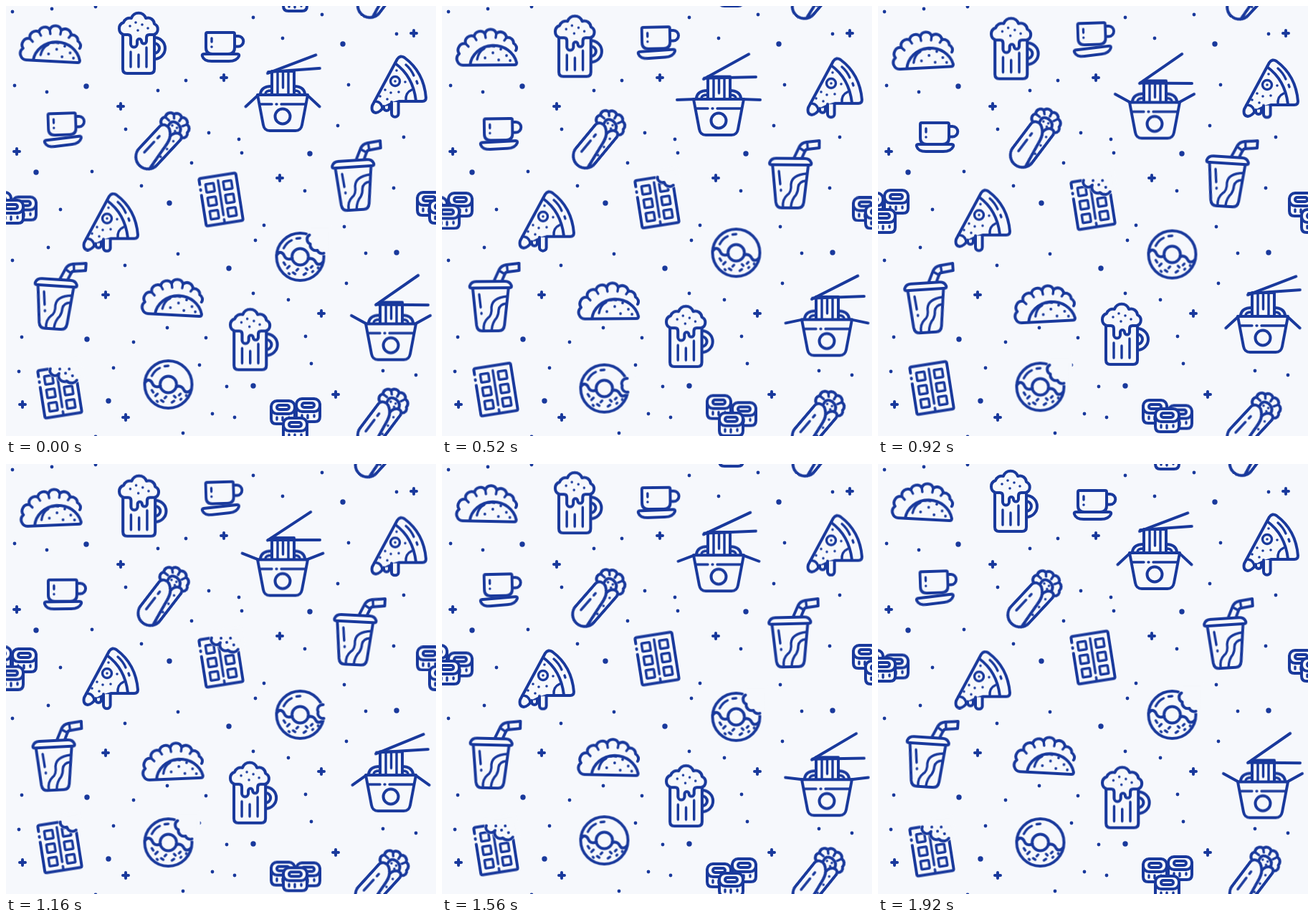
Recreate the animation shown at these times as an HTML page. Size 600 by 600 pixels, loop 1960 ms.

```html
<!DOCTYPE html>
<html lang="en">
<head>
<meta charset="utf-8">
<title>Street food pattern</title>
<style>
  :root { --ink: #19399c; --paper: #f6f8fc; }
  html, body { margin: 0; width: 100%; height: 100%; overflow: hidden; background: var(--paper); }
  svg {
    display: block; width: 100vw; height: 100vh;
    fill: none; stroke: var(--ink); stroke-width: 4;
    stroke-linecap: round; stroke-linejoin: round;
  }
  .solid { fill: var(--paper); }
  .fine { stroke-width: 3.4; }
  .dots { fill: var(--ink); stroke: none; }
  .erase { fill: var(--paper); stroke: var(--paper); stroke-width: 5; }
  .drip { vector-effect: non-scaling-stroke; }

  /* Each loop runs 1920 ms, then rests for 40 ms. */
  .sway, .wave, .bite { animation: 1960ms infinite; }
  .sway { animation-name: sway; animation-timing-function: cubic-bezier(.364, 0, .636, 1); }
  .wave { animation-name: wave; }
  .bite { animation-timing-function: step-end; }
  .first { animation-name: first; }
  .second { animation-name: second; }
  .alt .sway { animation-name: sway-alt; }
  .alt .wave { animation-name: wave-alt; }
  .alt .first { animation-name: first-alt; }
  .alt .second { animation-name: second-alt; }

  @keyframes sway {
    0%, 97.96%, 100% { transform: var(--a); }
    48.98% { transform: var(--b); }
  }
  @keyframes sway-alt {
    0%, 97.96%, 100% { transform: var(--b); }
    48.98% { transform: var(--a); }
  }
  @keyframes wave {
    0% { transform: translateY(0px); animation-timing-function: cubic-bezier(.39, .575, .565, 1); }
    24.49% { transform: translateY(var(--up)); animation-timing-function: cubic-bezier(.364, 0, .636, 1); }
    73.47% { transform: translateY(var(--down)); animation-timing-function: cubic-bezier(.47, 0, .745, .715); }
    97.96%, 100% { transform: translateY(0px); }
  }
  @keyframes wave-alt {
    0% { transform: translateY(0px); animation-timing-function: cubic-bezier(.39, .575, .565, 1); }
    24.49% { transform: translateY(var(--down)); animation-timing-function: cubic-bezier(.364, 0, .636, 1); }
    73.47% { transform: translateY(var(--up)); animation-timing-function: cubic-bezier(.47, 0, .745, .715); }
    97.96%, 100% { transform: translateY(0px); }
  }
  @keyframes first { 0%, 28.57%, 100% { opacity: 0; } 10.2% { opacity: 1; } }
  @keyframes second { 0%, 68.37%, 100% { opacity: 0; } 28.57% { opacity: 1; } }
  @keyframes first-alt { 0%, 77.55%, 100% { opacity: 0; } 59.18% { opacity: 1; } }
  @keyframes second-alt { 0%, 77.55%, 100% { opacity: 1; } 19.39% { opacity: 0; } }
</style>
</head>
<body>
<svg id="stage" viewBox="0 0 600 600"></svg>
<script>
const path = (d, cls = '') => `<path class="${cls}" d="${d}"/>`;
const fine = d => path(d, 'fine');
const at = (x, y, body, more = '') => `<g transform="translate(${x} ${y}) ${more}">${body}</g>`;
const sway = (a, b, body, origin = '0px 0px') =>
  `<g class="sway" style="--a:${a};--b:${b};transform-origin:${origin}">${body}</g>`;
const rise = (y, body) => sway('translateY(0px)', `translateY(${y}px)`, body);
const wave = (y, body) => `<g class="wave" style="--up:${y}px;--down:${-y}px">${body}</g>`;

function dots(r, list) {
  let d = '';
  for (let i = 0; i < list.length; i += 2)
    d += `M${list[i] - r} ${list[i + 1]}a${r} ${r} 0 1 0 ${2 * r} 0a${r} ${r} 0 1 0 ${-2 * r} 0`;
  return path(d, 'dots');
}

// A bite erases an edge, then outlines the scallops left behind.
const bite = (order, edge, outside, crumbs = '') =>
  `<g class="bite ${order}">${path(edge + outside + 'Z', 'erase')}${path(edge)}${crumbs}</g>`;

function taco() {
  return sway('translateY(-5px) rotate(3deg)', 'translateY(4.5px) rotate(-3deg)',
    path('M30 82A9 9 0 0 1 24 66A9 9 0 0 1 33 52A8.5 8.5 0 0 1 45 42A8.5 8.5 0 0 1 60 38A8.5 8.5 0 0 1 76 38A8.5 8.5 0 0 1 90 44A8 8 0 0 1 100 52A7 7 0 0 1 103 62') +
    fine('M33 52l4 4M45 42l3 5M60 38l1 6M76 38l-1 6M90 44l-3 4') +
    path('M30 82H101Q104 82 104 79A33 31 0 0 0 39 82', 'solid') +
    fine('M49 74Q51 63 59 59M65 56Q69 55 73 56') +
    dots(1.9, [82, 60, 71, 65, 90, 69, 60, 72, 79, 75, 95, 76]), '62px 60px');
}

function mug() {
  return sway('translateY(0px) scaleX(1)', 'translateY(7.5px) scaleX(1.025)',
    path('M207 44A15 15 0 0 1 207 74M207 52A7 7 0 0 1 207 66') +
    path('M163 40V88q0 6 6 6H201q6 0 6 -6V40', 'solid') +
    fine('M174 64V85M185 68V85M196 58V85') +
    path('M164 40A9 9 0 0 1 164 23A9 9 0 0 1 175 17A10.5 10.5 0 0 1 195 17A9 9 0 0 1 207 25A8 8 0 0 1 206 40H200q-4 0 -4 4V49a3.5 3.5 0 0 1 -7 0a3 3 0 0 0 -6 0V53a4.5 4.5 0 0 1 -9 0V44q0 -4 -4 -4Z', 'solid') +
    dots(1.8, [181, 23, 190, 26, 173, 28, 198, 31, 184, 34]), '157px 0px');
}

function cup() {
  return sway('translateY(0px) rotate(0deg)', 'translateY(-8.5px) rotate(-7deg)',
      path('M276 67H323Q326 67 325 70Q322 77 311 77H287Q276 77 274 70Q273 67 276 67Z', 'solid'), '300px 70px') +
    sway('translateY(0px) rotate(0deg) scaleX(1)', 'translateY(-12.5px) rotate(-2deg) scaleX(.96)',
      path('M319 42H324a7.3 7.3 0 0 1 0 14.6H319') +
      path('M281 37H317Q319 37 319 39V58q0 9 -9 9H288q-9 0 -9 -9V39Q279 37 281 37Z', 'solid') +
      fine('M287 45V50') + dots(1.8, [287, 57]), '278px 52px');
}

function noodles() {
  const wing = at(352, 124, sway('rotate(-43deg)', 'rotate(29deg)', path('M0 0H-24')));
  const heap = path('M355 122Q357 112 370 112') + fine('M362 122Q363 118 370 118');
  const mirror = body => at(772, 0, body, 'scale(-1 1)');
  return rise(10.5, heap + mirror(heap)) +
    rise(13.5, path('M371 126V91H402V126', 'solid') + fine('M379 93V124M386.5 93V114M394 93V124')) +
    rise(10.5,
      path('M351 124H421L413 166q-1.5 8 -9 8H368q-7.5 0 -9 -8Z', 'solid') +
      fine('M355 137H371M377 137h1M384 137H417') +
      '<circle cx="386" cy="154" r="10.5"/>' + wing + mirror(wing)) +
    sway('translate(365px,94px) rotate(-20.8deg)', 'translate(365px,108px) rotate(-34.8deg)', path('M0 0H72')) +
    sway('translate(366px,92px) rotate(-4deg)', 'translate(366px,107.5px) rotate(.5deg)', path('M0 0H72'));
}

function pizza() {
  return rise(5,
    path('M546 74Q550 68 556 72Q583 92 586 128Q586 133 581 133H549L536 137L526 142Q522 148 516 149Q509 148 511 139Z', 'solid') +
    path('M543 80Q568 98 572 132') +
    fine('M558 82Q565 88 569 97M573 105L574 108') +
    fine('M558 132Q557 121 566 117M514 133Q524 133 525 143') +
    '<circle cx="543" cy="105" r="6.5" class="fine"/>' +
    path('M527 140V142a4 4 0 0 0 8 0V139', 'solid') +
    sway('scaleY(1)', 'scaleY(.79)',
      path('M538 134V150a4.8 4.8 0 0 0 9.6 0V134', 'solid drip'), '0px 134px') +
    dots(1.8, [543, 105, 529, 117, 537, 121, 522, 126, 548, 120, 532, 130, 545, 90, 557, 106]));
}

function burrito() {
  return at(220, 187, sway('translate(0px,0px) rotate(-47deg)', 'translate(1px,-4.5px) rotate(-53deg)',
    path('M14 -17A6.5 6.5 0 0 1 25 -20A7 7 0 0 1 36 -14A7 7 0 0 1 40 -3A7 7 0 0 1 38 9A7 7 0 0 1 30 17A6 6 0 0 1 20 17', 'solid') +
    fine('M25 -20L25 -13M36 -14L32 -10M40 -3L34 -2M38 9L32 6') +
    path('M17 -8Q29 -13 30 -1Q30 8 21 10') +
    path('M10 -17H-32A17 17 0 0 0 -32 17H16Q23 16 21 9Q18 3 10 3Q20 -5 17 -12Q15 -17 10 -17Z', 'solid') +
    path('M10 3Q4 7 -8 8L-43 13') +
    fine('M-31 -8H-11M-4 -8H0') +
    dots(1.8, [23, -5, 25, 2, 20, 3, -20, 13, -6, 12, 8, 11])));
}

function soda() {
  return sway('translateY(2.5px) rotate(-3.7deg)', 'translateY(-2.5px) rotate(3.7deg)',
    path('M491 212L498 197Q501 191 508 190L526 188V198L510 200Q507 200 506 203L502 212', 'solid') +
    fine('M509 190L510 200M498 198L506 203') +
    path('M461 222L466 274q1 8 8 8H497q7 0 8 -8L511 222', 'solid') +
    fine('M476 281Q475 270 482 264Q488 260 487 249Q488 236 509 234M487 281Q488 270 494 264Q497 259 497 253Q498 245 508 244') +
    fine('M470 231L472 249M473 257v1') +
    path('M459 222Q456 222 457 219Q459 213 466 213H506Q513 213 515 219Q516 222 513 222Z', 'solid'), '486px 247px');
}

function chocolate() {
  let squares = '';
  for (const x of [-12.5, 12.5])
    for (const y of [-18.5, .5, 19.5])
      squares += `<rect x="${x - 5.7}" y="${y - 5.7}" width="11.4" height="11.4" rx="1" class="fine"/>`;
  return rise(5, at(300, 270,
    path('M-26 -25V-31Q-26 -33.5 -23.5 -33.5H23.5Q26 -33.5 26 -31V31Q26 33.5 23.5 33.5H-23.5Q-26 33.5 -26 31V-10M-26 -18v1') +
    fine('M0 -27V22M0 28V33') + squares +
    bite('first', 'M6 -33.5A7 7 0 0 0 14 -25A8 8 0 0 0 26 -19', 'L34 -19V-42H6') +
    bite('second', 'M-8 -33.5A7 7 0 0 0 3 -25A8 8 0 0 0 12 -13A9 9 0 0 0 26 -12', 'L34 -12V-42H-8',
      dots(2, [5, -31, 12, -24, 18, -29, 21, -19])), 'rotate(-9)'));
}

function donut() {
  return at(226.5, 529.5, wave(4, sway('translateY(-1.4px)', 'translateY(1.4px)',
    '<circle r="33"/><circle r="11.5"/>' +
    path('M-33 -2C-29 -9 -24 -6 -22 -1S-14 4 -11 2M11 3C17 1 20 4 22 8S29 11 32 7') +
    fine('M-23 -12Q-19 -20 -12 -23M-5 -25.5L0 -26') +
    fine('M-23 8l2 3M-15 13l-3 3M-10 22l3 2M-3 17l-2 2M5 25l3 -2M8 16l2 2M17 13l-2 2M17 21l1 -1M-16 23l1 1M25 15v1') +
    bite('first', 'M32 -14A7 7 0 0 0 25 -4A7 7 0 0 0 33 5', 'L42 5V-14') +
    bite('second', 'M13 -30.5A7 7 0 0 0 14 -18A8 8 0 0 0 24 -9A7 7 0 0 0 33 -5', 'L42 -5V-42H13'))));
}

function sushi() {
  const roll =
    path('M2 10V27q0 7 7 7H28q7 0 7 -7V10', 'solid') +
    '<rect x="2" y="2" width="33" height="18" rx="8" class="solid"/>' +
    '<rect x="10" y="8" width="17" height="6" rx="3"/>' +
    fine('M10 25v3M18 25v4M27 25v2');
  return wave(-7.5, at(368, 549, roll)) +
    rise(9.5, at(403, 546, roll)) +
    rise(-13, at(385, 573, roll));
}

const place = (icon, x = 0, y = 0, alt = false) => `<g class="${alt ? 'alt' : ''}">${at(x, y, icon())}</g>`;

const specks = [
  64, 4, 125, 1, 345, 16, 441, 12, 386, 45, 545, 39, 251, 104, 212, 118, 57, 120, 12, 111,
  478, 110, 463, 167, 167, 172, 283, 177, 325, 186, 329, 205, 555, 183, 259, 219, 120, 231, 189, 251,
  417, 258, 541, 254, 76, 284, 360, 306, 472, 308, 348, 327, 59, 337, 9, 355, 166, 362, 240, 346,
  502, 345, 475, 387, 345, 401, 394, 410, 225, 449, 279, 463, 22, 462, 178, 469, 418, 461, 18, 510,
  150, 505, 270, 501, 426, 499, 308, 531, 526, 509, 572, 515, 288, 569, 319, 574, 247, 596, 9, 8, 125, 601
];
const spots = [470, 53, 112, 112, 424, 206, 42, 232, 228, 275, 311, 366, 545, 344, 113, 465, 345, 530, 143, 551];
const pluses = [[569, 38], [304, 100], [160, 140], [15, 203], [382, 240], [139, 403], [440, 429], [460, 542], [23, 556], [167, 574]];

document.getElementById('stage').innerHTML = [
  dots(2.4, specks),
  dots(3.7, spots),
  path(pluses.map(([x, y]) => `M${x - 4} ${y}h8M${x} ${y - 4}v8`).join('')),
  place(taco), place(taco, 170, 354),
  place(mug), place(mug, 155, 406, true),
  place(cup), place(cup, -220, 126, true),
  place(noodles), place(noodles, 151, 309, true),
  place(pizza), place(pizza, -402, 186.5, true),
  place(burrito), place(burrito, 306, 391, true), place(burrito, 306, -209, true),
  place(soda), place(soda, -418, 171, true),
  place(chocolate), place(chocolate, -225, 263, true),
  place(donut), place(donut, 184, -181, true),
  place(sushi), place(sushi, 0, -600),
  place(sushi, 204, -291, true), place(sushi, -396, -291, true)
].join('');
</script>
</body>
</html>
```
